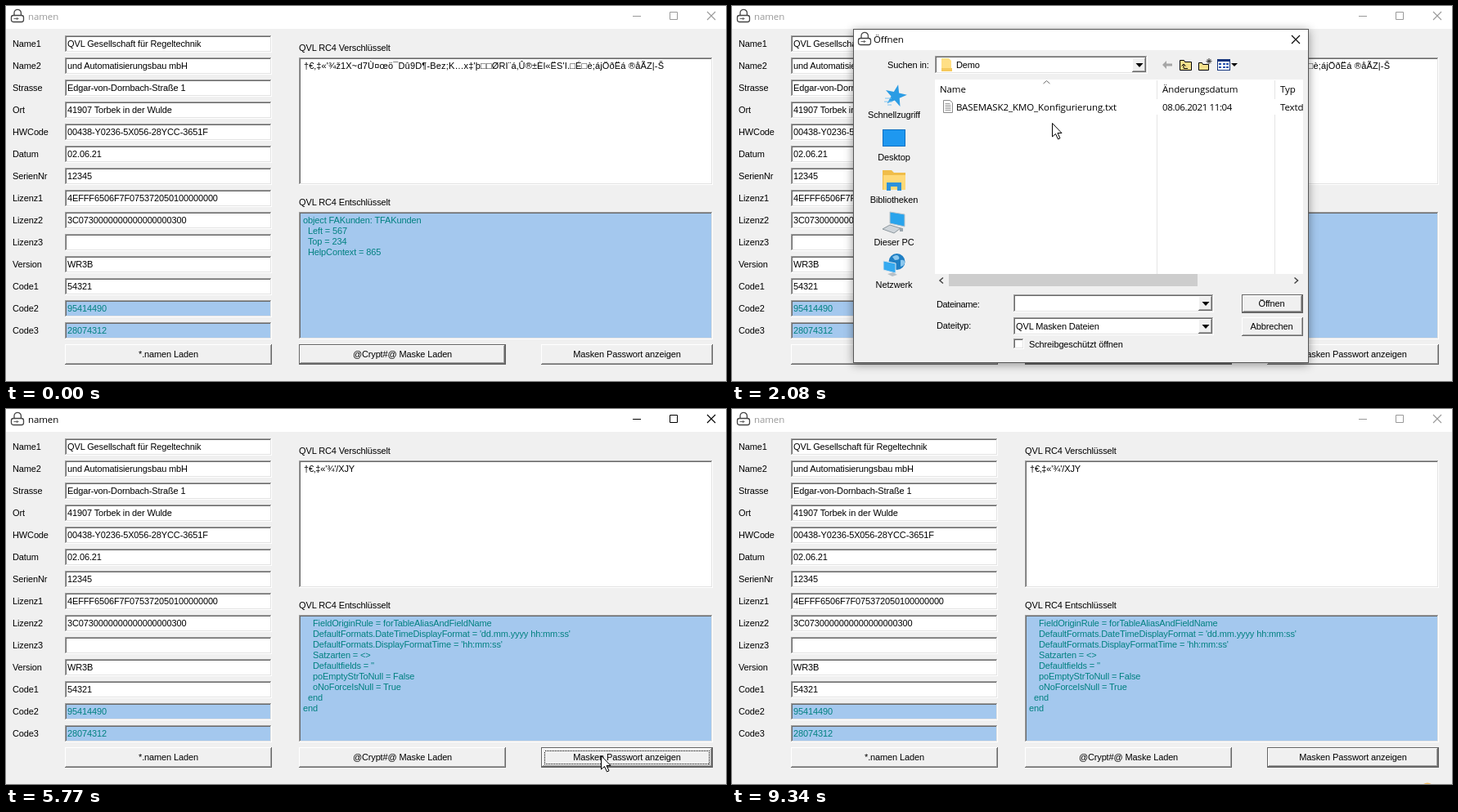
An HTML page for the animation above (9410 ms loop, 880 px wide and 459 px high).

```html
<!DOCTYPE html>
<html lang="de">
<head>
<meta charset="utf-8">
<style>
html, body { margin: 0; width: 100%; height: 100%; overflow: hidden; background: #f0f0f0; }
svg { display: block; width: 880px; height: 459px; cursor: default; }
rect { shape-rendering: crispEdges; }
text { font: 11px "Liberation Sans", Arial, sans-serif; letter-spacing: -.13px; white-space: pre; }
.ui { font: 11.5px "Open Sans", "Noto Sans", sans-serif; letter-spacing: -.1px; }
.tight { letter-spacing: -.38px; }
.cipher { letter-spacing: .17px; }
.mid { text-anchor: middle; }
.memo { fill: #008080; }
.shadow { filter: drop-shadow(0 2px 6px #0006); }
.dots { fill: none; stroke: #000; stroke-dasharray: 1 1; }
</style>
</head>
<body>
<svg id="stage" viewBox="0 0 880 459"></svg>
<script>
const LOOP = 9410, BLUE = '#a4c8ee', FACE = '#f0f0f0';
const FILE = 'BASEMASK2_KMO_Konfigurierung.txt';

const rect = (x, y, w, h, fill, more = '') =>
  `<rect x="${x}" y="${y}" width="${w}" height="${h}" fill="${fill}" ${more}/>`;
const text = (x, y, s, cls = '', more = '') =>
  `<text x="${x}" y="${y}" class="${cls}" ${more}>${s}</text>`;
const path = (d, fill = 'none', stroke = 'none', more = '') =>
  `<path d="${d}" fill="${fill}" stroke="${stroke}" ${more}/>`;
const group = (id, body) => `<g id="${id}">${body}</g>`;

// Two-pixel classic edge: outer/inner top-left, inner/outer bottom-right
const edge = (x, y, w, h, fill, [a, b, c, d]) =>
  rect(x, y, w, h, d) + rect(x, y, w - 1, h - 1, a) +
  rect(x + 1, y + 1, w - 2, h - 2, c) + rect(x + 1, y + 1, w - 3, h - 3, b) +
  rect(x + 2, y + 2, w - 4, h - 4, fill);
const sunken = (x, y, w, h, fill = '#fff') =>
  edge(x, y, w, h, fill, ['#a0a0a0', '#696969', '#e3e3e3', '#fff']);
const raised = (x, y, w, h) =>
  edge(x, y, w, h, FACE, ['#fff', FACE, '#a0a0a0', '#696969']);
const thick = (x, y, w, h) => rect(x, y, w, h, '#646464') + raised(x + 1, y + 1, w - 2, h - 2);
const dots = (x, y, w, h) => rect(x + 4.5, y + 4.5, w - 9, h - 9, 'none', 'class="dots"');
const caption = (x, y, w, h, s) => text(x + w / 2, Math.floor(y + h / 2) + 4, s, 'mid');
const cross = (x, y) => path(`M${x} ${y}l10 10m0 -10l-10 10`, 'none', 'currentColor', 'stroke-width="1.1"');
const arrowDown = (x, y) => path(`M${x} ${y}h9l-4.5 5z`, '#000');
const combo = (x, y, w, h) =>
  sunken(x, y, w, h) + raised(x + w - 19, y + 2, 17, h - 4) + arrowDown(x + w - 14.5, y + h / 2 - 2);
const lock = (x, y) => `<g transform="translate(${x} ${y})">` +
  path('M5 9V5.500a4.200 4.200 0 0 1 8.400 0V9', 'none', '#444', 'stroke-width="1.3"') +
  path('M4 8.500h10q2.500 0 2.500 2.500v3q0 2.500-2.500 2.500H4q-2.500 0-2.500-2.500v-3q0-2.500 2.500-2.500z', '#fff', '#444', 'stroke-width="1.3"') +
  path('M4.500 12.500h6m-2-1.500v3', 'none', '#666') + '</g>';

const buttons = [
  [72, 414, 253, 25, '*.namen Laden'],
  [358, 414, 253, 25, '@Crypt#@ Maske Laden'],
  [654, 414, 210, 25, 'Masken Passwort anzeigen']
];
const fields = [
  ['Name1', 'QVL Gesellschaft für Regeltechnik'],
  ['Name2', 'und Automatisierungsbau mbH'],
  ['Strasse', 'Edgar-von-Dornbach-Straße 1'],
  ['Ort', '41907 Torbek in der Wulde'],
  ['HWCode', '00438-Y0236-5X056-28YCC-3651F'],
  ['Datum', '02.06.21'],
  ['SerienNr', '12345'],
  ['Lizenz1', '4EFFF6506F7F075372050100000000'],
  ['Lizenz2', '3C0730000000000000000300'],
  ['Lizenz3', ''],
  ['Version', 'WR3B'],
  ['Code1', '54321'],
  ['Code2', '95414490'],
  ['Code3', '28074312']
];
const memo = lines => lines.map(([indent, s], i) =>
  text(363 + indent * 3, 266 + i * 13, s, 'memo')).join('');

function mainWindow() {
  const form = fields.map(([label, value], i) => {
    const y = 36 + i * 27, code = i > 11;
    return text(8, y + 14, label) + sunken(72, y, 253, 21, code ? BLUE : '#fff') +
      text(75, y + 14, value, code ? 'memo' : '');
  }).join('');
  return rect(0, 0, 880, 459, FACE) + rect(0, 0, 880, 28, '#fff') + lock(5, 3) +
    group('bar', text(27, 17, 'namen', 'ui', 'fill="currentColor"') +
      path('M766 12.500h10M811.500 7.500h9v9h-9z', 'none', 'currentColor') + cross(857, 7)) +
    form +
    text(358, 55, 'QVL RC4 Verschlüsselt') + sunken(358, 63, 506, 156) +
    text(358, 244, 'QVL RC4 Entschlüsselt') + sunken(358, 252, 506, 156, BLUE) +
    group('before', text(364, 77, '†€‚‡«\'¾ž1X~d7Ù¤œö¯Dû9D¶-Bez;K…x‡\'þ□□ØRI¨á‚Û®±Èl«ËS\'I.□É□è;ájÖðËá ®åÃZ|-Š', 'cipher') +
      memo([[0, 'object FAKunden: TFAKunden'], [2, 'Left = 567'], [2, 'Top = 234'], [2, 'HelpContext = 865']])) +
    group('after', text(364, 77, '†€‚‡«\'¾\'/XJY') + memo([
      [4, 'FieldOriginRule = forTableAliasAndFieldName'],
      [4, "DefaultFormats.DateTimeDisplayFormat = 'dd.mm.yyyy hh:mm:ss'"],
      [4, "DefaultFormats.DisplayFormatTime = 'hh:mm:ss'"],
      [4, 'Satzarten = &lt;&gt;'], [4, "Defaultfields = ''"], [4, 'poEmptyStrToNull = False'],
      [4, 'oNoForceIsNull = True'], [2, 'end'], [0, 'end']])) +
    buttons.map(([x, y, w, h, s], i) => raised(x, y, w, h) +
      group('default' + i, thick(x, y, w, h)) + group('focus' + i, dots(x, y, w, h)) +
      caption(x, y, w, h, s)).join('') +
    group('blob', '<circle cx="850" cy="466" r="8.500" fill="#f3bd62"/>');
}

function sidebar() {
  const star = Array.from({ length: 10 }, (_, i) => {
    const r = i % 2 ? 5.5 : 14, a = i * Math.PI / 5 - 1.35;
    return `${(200 + r * Math.cos(a)).toFixed(1)} ${(110 + r * Math.sin(a)).toFixed(1)}`;
  }).join('L');
  const screen = (x, y) => path(`M${x} ${y}l18 3v15l-18-4z`, '#29a4ec', '#b8c4cc');
  return path(`M${star}z`, '#2b9ce4') + path('M187 113h8M186 117h10M190 121h5', 'none', '#7cc4f2') +
    rect(184, 151, 28, 21, '#0d6fc2') + rect(185, 152, 26, 19, '#1e98f0') +
    path('M184 201h11l3 3h14v21h-28z', '#f0bd4a') + rect(185, 207, 27, 18, '#ffd978') +
    path('M189 226v-10h18v10h-5v-5h-8v5z', '#2c92dc') +
    screen(193, 252) + path('M184 273l9-5 13 4-8 6z', '#cfd5da', '#8d989f') + path('M205 271l4 1v4h-4z', '#9aa6ae') +
    '<circle cx="201.500" cy="313" r="10" fill="#1f7fc4"/>' +
    path('M196 307q6-4 8 0t-5 4zM206 311q5-1 5 3t-5 5z', '#8cc8ee') +
    path('M185 312l15 3v12l-15-4z', '#35aaf0', '#dce6ee') + path('M190 328l7-2 5 3-6 2z', '#b6c0c8') +
    ['Schnellzugriff', 'Desktop', 'Bibliotheken', 'Dieser PC', 'Netzwerk']
      .map((s, i) => text(198, 137 + i * 52, s, 'mid')).join('');
}

function toolbar() {
  return path('M526 72l5-5v3.500h7v3h-7v3.500z', '#a6a6a6') +
    path('M547.500 78.500v-12h5l1 2h8v10z', '#f4e08c', '#000') + path('M552 76.500h5M552 76v-5m-2.500 2.500l2.500-2.500 2.500 2.500', 'none', '#000') +
    path('M570.500 78.500v-9h4l1 2h7v7z', '#f4e08c', '#000') + path('M583 64v7m-3.500-3.500h7m-6-2.500l5 5m0-5l-5 5', 'none', '#333') +
    rect(593, 65, 16, 14, '#15357c') + rect(594, 68, 14, 10, '#fff') +
    [0, 1, 2].map(i => rect(595 + i * 4.5, 70, 3, 2, '#2a55b0') + rect(595 + i * 4.5, 74, 3, 2, '#2a55b0')).join('') +
    path('M610 70h8l-4 4z', '#000');
}

function openDialog() {
  const column = x => rect(x, 91, 1, 237, '#e5e5e5');
  return rect(148, 28, 557, 409, '#555', 'class="shadow"') + rect(149, 29, 555, 407, FACE) +
    rect(149, 29, 555, 25, '#fff') +
    group('dlgIcon', lock(153, 31) + cross(684, 36)) + text(173, 45, 'Öffnen', 'ui', 'id="dlgTitle"') +
    text(190, 76, 'Suchen in:') + combo(248, 61, 260, 22) +
    path('M256 64h9l3 3v13h-12z', '#ffdf85') + rect(256, 76, 13, 4, '#f5c95c') + text(274, 76, 'Demo') +
    toolbar() + sidebar() +
    rect(248, 90, 450, 254, '#fff') + column(519) + column(663) +
    path('M380.500 95l4-3.500 4 3.500', 'none', '#666') +
    text(254, 106, 'Name', 'ui') + text(526, 106, 'Änderungsdatum', 'ui') + text(670, 106, 'Typ', 'ui') +
    rect(252, 114, 446, 19, '#fff', 'id="row"') +
    path('M258.500 115.500h8l3 3v12h-11z', '#fff', '#8a8a8a') +
    path('M260.500 119.500h6m-6 2h7m-7 2h7m-7 2h7m-7 2h7', 'none', '#9a9a9a') +
    text(274, 128, FILE, 'ui') + text(526, 128, '08.06.2021 11:04', 'ui tight') + text(670, 128, 'Textd', 'ui') +
    rect(248, 328, 450, 16, FACE) + rect(265, 328, 304, 15, '#cdcdcd') +
    path('M258 332.500l-4 3.500 4 3.500M687.500 332.500l4 3.500-4 3.500', 'none', '#444', 'stroke-width="1.5"') +
    text(250, 369, 'Dateiname:', 'tight') + combo(344, 353, 245, 22) +
    group('chosen', rect(346, 357, 0, 15, '#0078d7', 'id="mark"') + text(347, 368, FILE, 'tight', 'id="chosenText"')) +
    text(250, 395, 'Dateityp:') + combo(344, 381, 245, 22) + text(347, 396, 'QVL Masken Dateien') +
    thick(623, 353, 75, 23) + caption(623, 353, 73, 23, 'Öffnen') +
    raised(623, 381, 75, 23) + caption(623, 381, 73, 23, 'Abbrechen') +
    sunken(344, 407, 13, 13) + text(363, 418, 'Schreibgeschützt öffnen');
}

function messageBox() {
  return rect(346, 258, 161, 132, '#666', 'class="shadow"') + rect(347, 259, 159, 130, FACE) +
    rect(347, 259, 159, 25, '#fff') + text(350, 275, 'namen', 'ui') + cross(486, 266) +
    text(359, 311, "Passwort = 'kmopasb0417'", 'ui') +
    thick(389, 348, 75, 26) + dots(389, 348, 75, 26) + text(426, 365, 'OK', 'ui mid');
}

const $ = id => document.getElementById(id);
$('stage').innerHTML = mainWindow() + group('dlg', openDialog()) + group('msg', messageBox()) +
  group('arrow', path('M.5.5v16.500l4-3.500 3 6.500 2.500-1.200-3-6.300h5z', '#fff', '#000')) +
  group('beam', path('M-3.500-7.500h3l.5.5.5-.5h3M-3.500 7.500h3l.5-.5.5.5h3M0-7V7', 'none', '#222'));

// Pointer stops: time, x, y
const stops = [
  [120, 850, 472], [560, 590, 374], [900, 453, 423], [1200, 453, 423], [2080, 391, 143],
  [2210, 391, 127], [2480, 391, 127], [3150, 653, 361], [3600, 653, 361], [3890, 437, 321],
  [4970, 437, 321], [5370, 727, 424], [6510, 727, 424], [6720, 418, 360], [6990, 418, 360],
  [7060, 420, 354], [8190, 420, 354], [8920, 850, 475]
];
function pointer(t) {
  const i = stops.findIndex(s => s[0] > t);
  if (i < 1) return [850, 475];
  const [t0, x0, y0] = stops[i - 1], [t1, x1, y1] = stops[i];
  const f = (t - t0) / (t1 - t0), e = f * f * (3 - 2 * f);
  return [x0 + (x1 - x0) * e, y0 + (y1 - y0) * e];
}

const show = (id, on) => $(id).style.display = on ? '' : 'none';

function draw(t) {
  const within = (a, b) => t >= a && t < b;
  const dlg = within(1200, 3630), msg = within(5900, 8190), closing = t >= 3520;
  const active = within(950, 1060) || within(3520, 5900) || within(8190, 9340);
  const current = t < 5770 ? 1 : 2;
  show('dlg', dlg);
  show('msg', msg);
  show('before', t < 4360);
  show('after', t >= 4360);
  show('blob', t >= 9340);
  $('bar').style.color = active ? '#000' : '#999';
  for (let i = 0; i < 3; i++) {
    show('default' + i, i === current);
    show('focus' + i, i === current && active);
  }

  show('dlgIcon', !closing);
  $('dlgTitle').setAttribute('x', closing ? 152 : 173);
  $('row').setAttribute('fill', t < 2210 ? '#fff' : t < 2270 ? '#e5f3ff' : t < 3350 ? '#cce8ff' : '#d9d9d9');
  show('chosen', t >= 2270);
  show('mark', t >= 3350);
  $('chosenText').setAttribute('fill', t >= 3350 ? '#fff' : '#000');
  if (dlg) $('mark').setAttribute('width', Math.ceil($('chosenText').getComputedTextLength()) + 2);

  const [x, y] = pointer(t).map(Math.round);
  const beam = !dlg && !msg && x > 359 && x < 863 && y > 253 && y < 407;
  show('beam', beam);
  show('arrow', !beam);
  $(beam ? 'beam' : 'arrow').setAttribute('transform', `translate(${x} ${y})`);
}

const start = performance.now();
function tick() {
  draw((performance.now() - start) % LOOP);
  requestAnimationFrame(tick);
}
tick();
</script>
</body>
</html>
```
